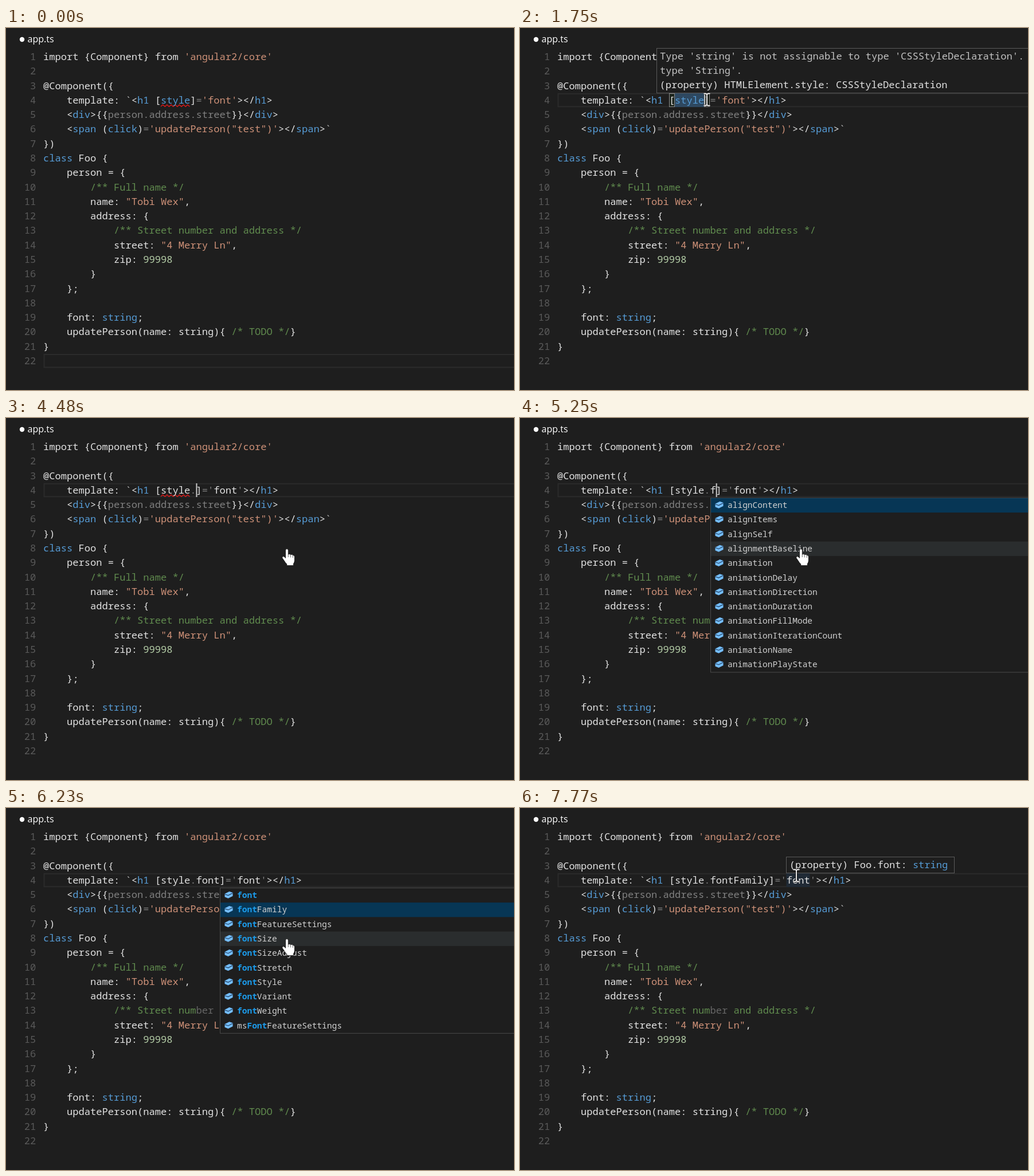
An HTML page that plays this animation: 886x632 px, repeating every 8 s.

```html
<!DOCTYPE html>
<html lang="en">
<head>
<meta charset="utf-8">
<title>app.ts</title>
<style>
  html, body { margin: 0; width: 100%; height: 100%; overflow: hidden; background: #1e1e1e; }
  svg { display: block; width: 886px; height: 632px; }
  text { white-space: pre; font-kerning: none; }
  .code { font: 17.08px "Noto Sans Mono", monospace; }
  .item { font: 14.53px "Noto Sans Mono", monospace; }
  .item .hit { font-weight: 700; fill: #1c9bea; }
  .title { font: 16px "Open Sans", sans-serif; }
</style>
</head>
<body>
<svg viewBox="0 0 886 632" xmlns="http://www.w3.org/2000/svg">
  <rect width="886" height="632" fill="#1e1e1e"/>
  <circle cx="28" cy="20" r="4.2" fill="#fff"/>
  <text class="title" x="37.5" y="25.3" fill="#fff">app.ts</text>
  <g id="under"></g>
  <g id="code"></g>
  <g id="over"></g>
  <g id="beam" fill="none">
    <path d="M-5.5-10.5h3.5L0-9.3l2-1.2h3.5M0-9.3V9.3M-5.5 10.5h3.5L0 9.3l2 1.2h3.5" stroke="#111" stroke-width="3.6"/>
    <path d="M-5.5-10.5h3.5L0-9.3l2-1.2h3.5M0-9.3V9.3M-5.5 10.5h3.5L0 9.3l2 1.2h3.5" stroke="#fff" stroke-width="1.8"/>
  </g>
  <g id="hand">
    <path fill="#fff" stroke="#111" stroke-width=".8" d="M487.5 231a2.4 2.4 0 0 1 4.8 0v7q3-1.2 4 .6q3-1 4 1q3-.6 3 2.5v7q0 3-2 5.5v3h-11.5v-2.5q-2.5-2-4-5l-3.8-5.5q-.8-2 1-2.8q1.5-.6 3 1l1.5 1.8z"/>
    <path fill="none" stroke="#444" stroke-width=".8" d="M492.3 238v5M496.3 239v4.5M500.2 240v4"/>
  </g>
</svg>
<script>
const LOOP = 8000, STEP = 70, CHAR = 10.248, LEFT = 65, PITCH = 25.286;
const COLORS = { w: '#e2e2e2', b: '#569cd6', s: '#ce9178', c: '#608b4e', n: '#b5cea8', g: '#808080', d: '#666', t: '#c2c2c2' };
const $ = id => document.getElementById(id);

// A section sign plus a letter switches the colour.
const LINES = [
  "import {Component} from §s'angular2/core'",
  "",
  "@Component({",
  "",
  "    <§bdiv§w>{{§gperson.address.street§w}}</§bdiv§w>",
  "    <§bspan§w (§bclick§w)§g=§s'updatePerson(\"test\")'§w></§bspan§w>§t`",
  "})",
  "§bclass§w Foo {",
  "    person = {",
  "        §c/** Full name */",
  "        name: §s\"Tobi Wex\"§w,",
  "        address: {",
  "",
  "            street: §s\"4 Merry Ln\"§w,",
  "            zip: §n99998",
  "        }",
  "    };",
  "",
  "    font: §bstring§w;",
  "    updatePerson(name: string){ §c/* TODO */§w}",
  "}",
  ""
];
const ALIGN = ['alignContent', 'alignItems', 'alignSelf', 'alignmentBaseline', 'animation',
  ...['Delay', 'Direction', 'Duration', 'FillMode', 'IterationCount', 'Name', 'PlayState'].map(s => 'animation' + s)];
const FONT = [...['', 'Family', 'FeatureSettings', 'Size', 'SizeAdjust', 'Stretch', 'Style', 'Variant', 'Weight'].map(s => 'font' + s),
  'msFontFeatureSettings'];

// Timelines: [start, value]
const TYPED = [[0, ''], [4410, '.'], [5250, '.f'], [5390, '.fo'], [5460, '.fon'], [5600, '.font'], [6440, '.fontFamily']];
const CARET = [[0, 0], [1330, 1], [1820, 0], [2240, 1], [2730, 0], [3150, 1], [3640, 0], [4060, 1],
  [4830, 0], [5250, 1], [6020, 0], [6440, 1], [6860, 0], [7280, 1], [7700, 0]];
const MENU = [[0, 0], [4550, 332], [5320, 342], [5390, 345], [5460, 354.5], [5670, 373], [6440, 0]];
// Pointer moves: start, end, from x, y, to x, y, hidden at
const MOVES = [
  [420, 490, 503, 330, 316, 79, 840],
  [840, 1330, 316, 79, 326, 125, 1750],
  [1750, 2240, 326, 125, 295, 120, 3150],
  [3150, 3500, 295, 120, 493, 230, 3850],
  [7000, 7350, 491, 228, 482, 118, LOOP]
];

const at = (list, t) => list.filter(k => k[0] <= t).pop()[1];
const within = (t, a, b) => t >= a && t < b;
const colX = n => LEFT + n * CHAR;
const midY = n => 50 + (n - 1) * PITCH;
const esc = s => s.replace(/&/g, '&amp;').replace(/</g, '&lt;');
const rect = (x, y, w, h, fill, stroke = 'none', sw = 1) =>
  `<rect x="${x}" y="${y}" width="${w}" height="${h}" fill="${fill}" stroke="${stroke}" stroke-width="${sw}"/>`;

function rich(src, x, y) {
  const spans = ('w' + src).split('§').map(p => p.length > 1
    ? `<tspan fill="${COLORS[p[0]]}">${esc(p.slice(1))}</tspan>` : '');
  return `<text class="code" x="${x}" y="${y}">${spans.join('')}</text>`;
}

function styleLine(typed) {
  const head = "    template: §t`§w<§bh1§w [";
  const tail = "§w></§bh1§w>";
  return typed
    ? `${head}style§g.§w${typed.slice(1)}]§g='§wfont§g'${tail}`
    : `${head}§bstyle§w]§g=§s'font'${tail}`;
}

function codeText(t) {
  return LINES.map((line, i) => {
    const n = i + 1, y = midY(n) + 6;
    if (n === 4) line = styleLine(at(TYPED, t));
    if (n === 13) line = `            §c/** Street num§${t < 4550 ? 'c' : 'd'}ber§c and address */`;
    return `<text class="code" x="52.3" y="${y}" fill="#5a5a5a" text-anchor="end">${n}</text>` + rich(line, LEFT, y);
  }).join('');
}

function squiggle() {
  let d = 'M270 137';
  for (let i = 1; i < 15; i++) d += `L${270 + i * 3.6} ${i % 2 ? 134 : 137.3}`;
  return `<path d="${d}" fill="none" stroke="#d81818" stroke-width="1.5"/>`;
}

function underlay(t) {
  let out = rect(66.5, midY(t < 1330 ? 22 : 4) - 11, 830, 22.4, 'none', '#2b2b2b', 2);
  if (within(t, 1330, 4410)) {
    out += rect(260.5, 114.5, 9, 23, '#1d251d', '#888') + rect(321.5, 114.5, 9, 23, '#1d251d', '#888');
  }
  if (within(t, 1610, 4410)) out += rect(270, 114, 51, 24, within(t, 1750, 3290) ? '#2e4860' : '#474747');
  else if (t < 4690) out += squiggle();
  if (t >= 7700) out += rect(464.5, 114, 41, 24, '#202a35');
  return out;
}

function label(word, key, x, y) {
  const i = key ? word.toLowerCase().indexOf(key) : -1, j = i + key.length;
  const body = i < 0 ? word : `${word.slice(0, i)}<tspan class="hit">${word.slice(i, j)}</tspan>${word.slice(j)}`;
  return `<text class="item" x="${x}" y="${y}" fill="#d0d0d0">${body}</text>`;
}

function menu(t) {
  const x = at(MENU, t);
  if (!x) return '';
  const items = t < 5390 ? ALIGN : FONT, picked = t < 6230 ? 0 : 1;
  const key = t < 5390 ? '' : at(TYPED, t).slice(1);
  let out = rect(x + .5, 139.5, 560, items.length * PITCH + 1, '#1e1e1e', '#4a4a4a');
  items.forEach((word, i) => {
    const y = 139.8 + i * PITCH;
    if (i === picked || i === 3) out += rect(x + 1, y, 560, PITCH, i === picked ? '#073655' : '#2a2d2e');
    out += `<g transform="translate(${x + 8.5} ${y + 6})"><path d="M0 4L8 0L14 2V8L6 12L0 9.5Z" fill="#75beff"/>` +
      '<path d="M0 4.6L6 6.8L14 2.6" fill="none" stroke="#1e3a55" stroke-width="1.1"/></g>';
    out += label(word, key, x + 30, y + 17.4);
  });
  return out;
}

function overlay(t) {
  let out = '';
  if (at(CARET, t)) out += rect(colX(25 + at(TYPED, t).length), 114, 2, 24, '#c8c8c8');
  if (within(t, 1750, 3290)) {
    out += rect(238.5, 35.5, 700, 78, '#1e1e1e', '#5a5a5a') +
      rich("§tType 'string' is not assignable to type 'CSSStyleDeclaration'.", 244, 55) +
      rich("§ttype 'String'.", 244, 80) +
      rich('(property) HTMLElement.style: CSSStyleDeclaration', 243.5, 105.3);
  }
  if (t >= 7700) {
    out += rect(464.5, 85.5, 293, 28, '#1e1e1e', '#5a5a5a') +
      rich('(property) Foo.font: §bstring', 469.7, 105.3);
  }
  return out + menu(t);
}

function pointer(t) {
  const m = MOVES.find(k => within(t, k[0], k[6]));
  $('beam').style.display = m ? '' : 'none';
  $('hand').style.display = within(t, 4410, 6440) ? '' : 'none';
  if (!m) return;
  const p = Math.min(1, (t - m[0]) / (m[1] - m[0])), e = p * p * (3 - 2 * p);
  $('beam').setAttribute('transform', `translate(${m[2] + (m[4] - m[2]) * e} ${m[3] + (m[5] - m[3]) * e})`);
}

const shown = {};
function put(id, html) {
  if (shown[id] !== html) $(id).innerHTML = shown[id] = html;
}

function draw() {
  const t = Math.floor(performance.now() % LOOP / STEP) * STEP;
  put('under', underlay(t));
  put('code', codeText(t));
  put('over', overlay(t));
  pointer(t);
  requestAnimationFrame(draw);
}
draw();
</script>
</body>
</html>
```
